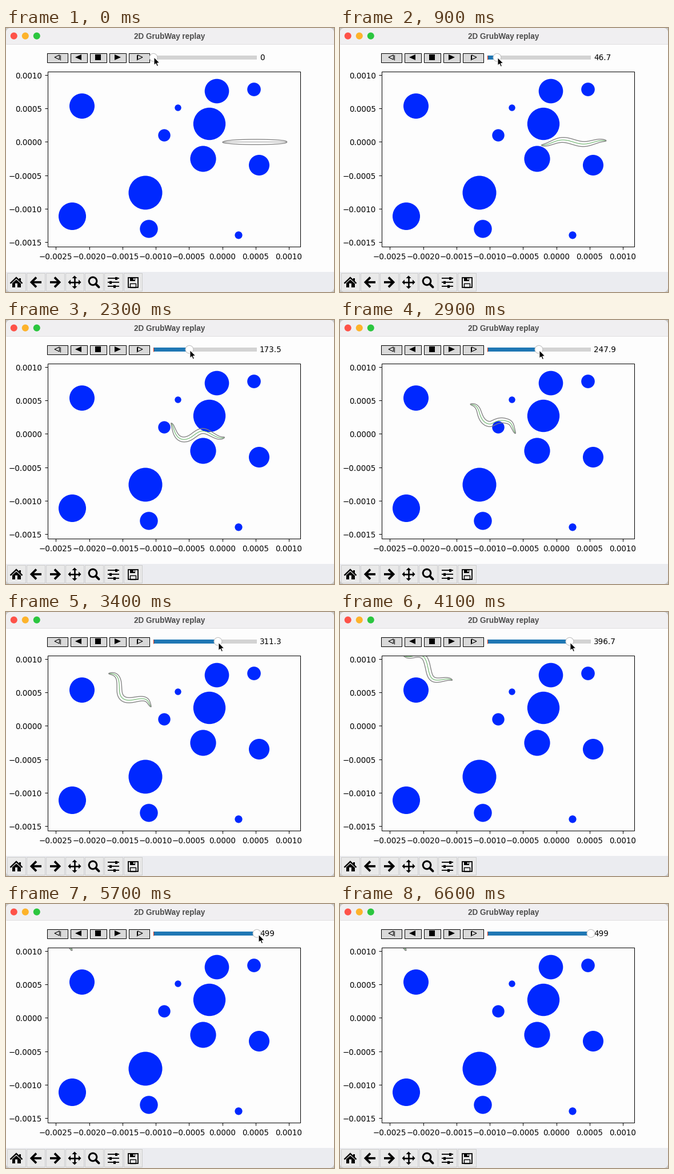
These frames come from a looping animation (574x460 px, 6700 ms). A matplotlib script:

```python
import numpy as np
import matplotlib.pyplot as plt
from matplotlib.animation import FuncAnimation
from matplotlib.patches import Circle, FancyBboxPatch, Polygon, Rectangle

W, H, DPI = 574, 460, 64
FRAMES, STEP_MS = 67, 100
PX = 72 / DPI  # points per pixel

fig = plt.figure(figsize=(W / DPI, H / DPI), dpi=DPI, facecolor="#c8c8c8")
ax = fig.add_axes([0, 0, 1, 1])
ax.set_xlim(0, W)
ax.set_ylim(H, 0)
ax.axis("off")

window = FancyBboxPatch((9, 9), W - 18, H - 18, boxstyle="round,pad=9,rounding_size=9",
                        fc="#fdfdfd", ec="none", zorder=0)
ax.add_patch(window)


def rect(x, y, w, h, fc="black", ec="none", lw=0, z=4):
    return ax.add_patch(Rectangle((x, y), w, h, fc=fc, ec=ec, lw=lw * PX, zorder=z))


def disc(x, y, r, fc, ec="none", lw=0, z=2):
    return ax.add_patch(Circle((x, y), r, fc=fc, ec=ec, lw=lw * PX, zorder=z))


def poly(pts, fc="black", ec="none", lw=0, z=4):
    return ax.add_patch(Polygon(pts, closed=True, fc=fc, ec=ec, lw=lw * PX,
                                joinstyle="miter", zorder=z))


def triangle(x, y, dx, dy, length, half, **kw):
    """Triangle with its tip at (x, y), pointing along (dx, dy)."""
    bx, by = x - dx * length, y - dy * length
    return poly([(x, y), (bx - dy * half, by + dx * half), (bx + dy * half, by - dx * half)], **kw)


def line(pts, color="black", lw=1.0, z=4, cap="butt"):
    x, y = np.transpose(pts)
    return ax.plot(x, y, color=color, lw=lw * PX, zorder=z,
                   solid_capstyle=cap, solid_joinstyle="miter")[0]


def label(x, y, s, **kw):
    style = dict(family="DejaVu Sans", color="black", va="center_baseline", ha="center",
                 zorder=4, fontsize=13.5 * PX)
    return ax.text(x, y, s, **{**style, **kw})


def title_bar():
    rect(0, 0, W, 28, "#f0eff1", z=1).set_clip_path(window)
    line([(0, 28), (W, 28)], "#e0dfe1", 1, 1)
    for k, c in enumerate(("#fe5249", "#fdb32b", "#2bc63f")):
        disc(13.8 + 20 * k, 13.8, 6, c)
    label(286.5, 14, "2D GrubWay replay", family="Liberation Sans", weight="bold", color="#4d4d4d")


def player_buttons():
    x, y = 72, 51
    for w in (36, 29, 29, 29, 36):
        rect(x, 44, w, 16, "#d9d9d9", "black", 1, 3)
        x += w + 5
    for tip, bar, d in ((85, 95, -1), (239, 229, 1)):
        triangle(tip, y, d, 0, 8.5, 4, fc="none", ec="black", lw=1.1)
        line([(bar, y - 4.5), (bar, y + 4.5)])
    triangle(121, y, -1, 0, 11, 5)
    rect(156, y - 5, 10, 10)
    triangle(201, y, 1, 0, 11, 5)


def plot_area():
    rect(73, 76, 442, 305, "none", "black", 1, 5)
    for k in range(-5, 3):
        text = f"{k * 0.0005:.4f}".replace("-", "\u2212")
        x, y = 378.6 + 58.25 * k, 198.4 - 58.3 * k
        line([(x, 381), (x, 386)])
        label(x - .3, 397.3, text)
        if k >= -3:
            line([(68, y), (73, y)])
            label(62.8, y + .4, text, ha="right")
    obstacles = [(133, 136, 22), (116, 328, 24), (244, 287, 29.5), (250, 350, 15.7),
                 (277, 187, 10.7), (301, 139, 5.7), (369, 110, 21.3), (356, 167, 28.2),
                 (345, 228, 22.6), (434, 107, 11.8), (443, 239, 18), (407, 361, 6.6)]
    for x, y, r in obstacles:
        disc(x, y, r, "#0028ff")


def toolbar():
    rect(0, 425, W, H - 425, "#ebecf0", z=1).set_clip_path(window)
    home, back, forward, pan, zoom, tune, save = xs = [18 + 34 * k for k in range(7)]
    y = 443
    for x in xs:
        rect(x - 16, y - 16, 32, 31, "#e9e9e9", "#cdcdcd", 1, 2)

    line([(home - 10.5, y + 2), (home, y - 8), (home + 10.5, y + 2)], lw=2.4)
    triangle(home, y - 4.5, 0, -1, 6.5, 7.5)
    rect(home + 5, y - 7, 2.5, 5)
    for side in (-7.5, 2):
        rect(home + side, y + 2, 5.5, 7)

    for x, d in ((back, 1), (forward, -1)):
        line([(x - 7 * d, y), (x + 9.5 * d, y)], lw=3.8)
        line([(x + d, y - 8.5), (x - 7.5 * d, y), (x + d, y + 8.5)], lw=3.8)

    for dx, dy in ((1, 0), (-1, 0), (0, 1), (0, -1)):
        line([(pan, y), (pan + 8 * dx, y + 8 * dy)], lw=2.6)
        triangle(pan + 11.5 * dx, y + 11.5 * dy, dx, dy, 4.5, 4.5)

    disc(zoom - 2, y - 2, 6.8, "none", "black", 3, 4)
    line([(zoom + 3, y + 3), (zoom + 8.5, y + 8.5)], lw=4, cap="round")

    for dy, dx in ((-7, 5), (0, -5), (7, 2)):
        line([(tune - 10, y + dy), (tune + 10, y + dy)], lw=1.8)
        rect(tune + dx - 2, y + dy - 2.5, 4, 5)

    rect(save - 8.5, y - 8.5, 17, 17, "none", "black", 1.8)
    rect(save - 5, y - 8, 9, 5.5)
    rect(save + .5, y - 7, 2, 3, "#e9e9e9", z=5)
    rect(save - 5, y + 2, 10, 6.5, "none", "black", 1.4)


# The worm is a travelling sine wave laid along a guide route.
ROUTE = np.array([(495, 198.6), (379, 198.6), (346, 203), (316, 203), (292, 189), (276, 171),
                  (252, 170), (215, 145), (192, 122), (160, 100), (115, 74), (100, 45), (96, -80)])
REACH = np.r_[0, np.cumsum(np.hypot(*np.diff(ROUTE, axis=0).T))]
LENGTH, RADIUS, WAVE = 116, 4.6, 74
TAIL_KEYS = ([0, 104.6, 173.5, 311.3, 396.7, 499], [0, 65, 113, 255, 331, 418])


def guide(u):
    """Point on the route at distance u, corners rounded by averaging."""
    near = u[:, None] + np.linspace(-12, 12, 9)
    return np.stack([np.interp(near, REACH, c).mean(axis=1) for c in ROUTE.T], axis=1)


def normals(pts):
    t = np.gradient(pts, axis=0)
    t /= np.hypot(*t.T)[:, None] + 1e-9
    return np.column_stack([-t[:, 1], t[:, 0]])


def worm_shape(value):
    amp = 13.5 * (1 - np.exp(-value / 150))
    steep = 2 * np.pi * amp / WAVE
    span = LENGTH / (1 + 0.21 * steep ** 2)  # a wavier body covers less route
    s = -np.cos(np.linspace(0, np.pi, 80))
    u = np.interp(value, *TAIL_KEYS) + span * (s + 1) / 2
    crest = 190 - 0.225 * value  # the wave slips backwards
    sway = amp * (1 - 0.4 * s ** 4) * np.cos(2 * np.pi * (u - crest) / WAVE)
    base = guide(u + (12 if value < 0 else 0))
    mid = base + normals(base) * sway[:, None]
    side = normals(mid) * (RADIUS * np.sqrt(1 - s ** 2))[:, None]
    return mid, np.vstack([mid + side, (mid - side)[::-1]])


title_bar()
player_buttons()
plot_area()
toolbar()

X0, X1, Y_BAR = 258, 439, 51.3
rect(X0, 48, X1 - X0, 7, "#d3d3d3", z=2)
fill = rect(X0, 48, 0, 7, "#1f77b4", z=3)
line([(X0, 48), (X0, 55)], "#e03010", 1)
readout = label(444, 50.7, "0", ha="left")
knob = disc(X0, Y_BAR, 6.9, "white", "#bfbfbf", 1, 5)

body = line([(0, 0), (1, 1)], "#808080", 1.3)
spine = line([(0, 0), (1, 1)], lw=1, z=3)
for part in (body, spine):
    part.set_clip_path(Rectangle((74, 77), 441, 304, transform=ax.transData))

ARROW = np.array([(0, 0), (0, 14), (3.2, 11.2), (5.3, 16), (7.6, 15), (5.6, 10.3), (10, 10)])
cursor = poly(ARROW, "black", "white", 1.1, 9)

VALUE_KEYS = ([0, 8, 16, 23, 34, 41, 50, 56], [0, 37, 104.6, 173.5, 311.3, 396.7, 468.4, 499])
RELEASE = 56


def update(n):
    # the slider follows whole pixels of the mouse
    step = round((np.interp(n, *VALUE_KEYS) + 0.13) / 2.756)
    value = 499 if step >= 181 else max(0, step * 2.756 - 0.13)
    x = X0 + (X1 - X0) * value / 499
    fill.set_width(x - X0)
    knob.center = (x, Y_BAR)
    readout.set_text(f"{value:.1f}" if 0 < value < 499 else f"{value:.0f}")

    mid, outline = worm_shape(value)
    spine.set_data(mid.T)
    spine.set_color("#5fae5f" if value else "#9a9a9a")
    body.set_data(np.vstack([outline, outline[:1]]).T)

    # after the release the pointer speeds away through the title bar
    away = max(0, n - RELEASE) / 7
    cursor.set_xy(ARROW + (x + 1 + 100 * away ** 2, 50.8 + 2.4 * min(n / 34, 1) - 46 * away ** 3))
    cursor.set_visible(away <= 1)
    return fill, knob, readout, spine, body, cursor


anim = FuncAnimation(fig, update, frames=FRAMES, interval=STEP_MS, repeat=True, blit=False)
plt.show()
```
